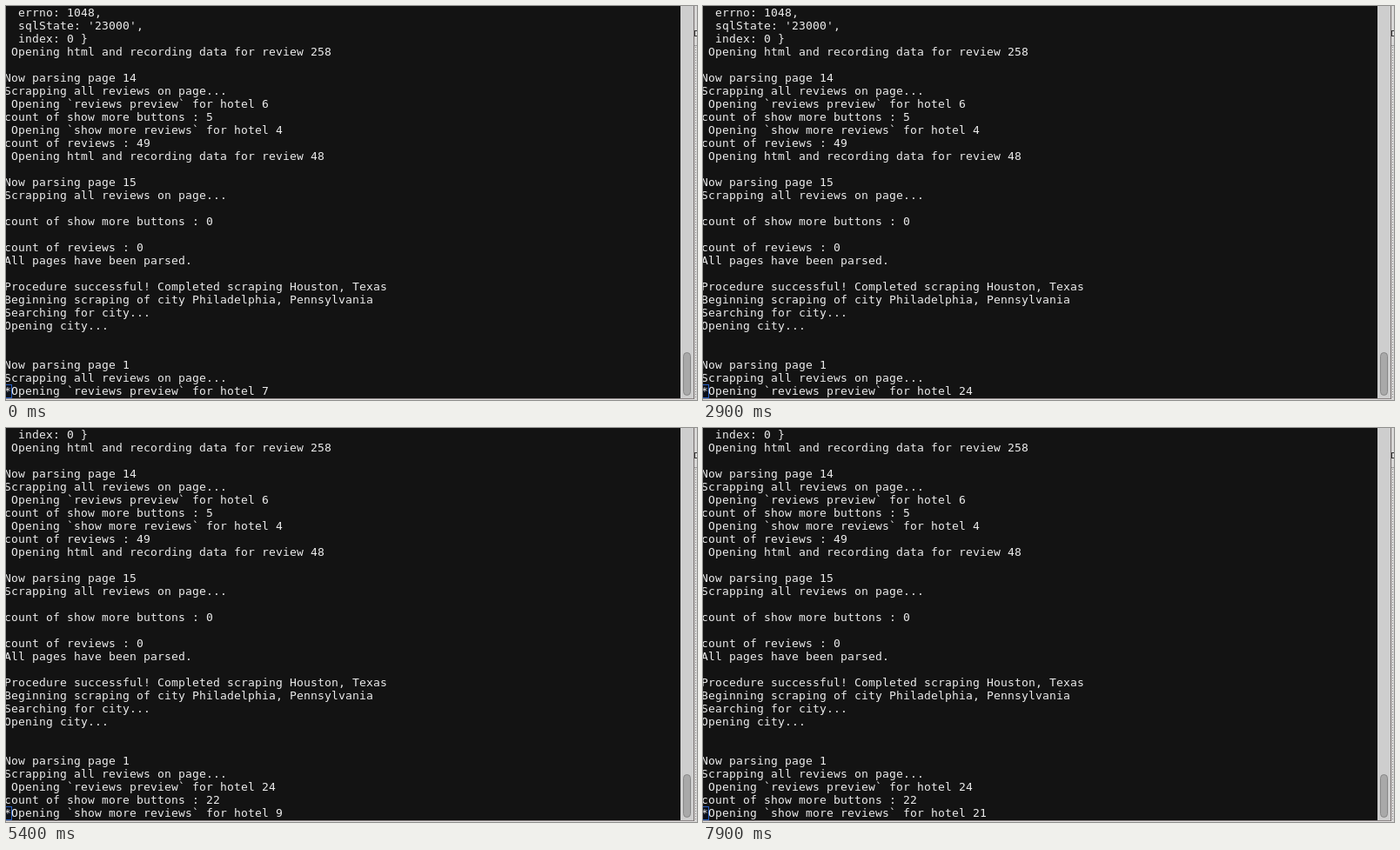
Write an HTML page that moves like this. It is 794 px wide and 453 px high and loops after 8000 ms.

```html
<!DOCTYPE html>
<html lang="en">
<head>
<meta charset="utf-8">
<title>Terminal</title>
<style>
  html, body { margin: 0; width: 100%; height: 100%; overflow: hidden; background: #131313; }
  #stage { position: relative; width: 794px; height: 453px; overflow: hidden; }
  svg { position: absolute; left: 0; top: 0; }
  pre {
    position: absolute; left: -2px; top: 0; margin: 0;
    font: 13px/15px "DejaVu Sans Mono", monospace;
    font-variant-ligatures: none;
    color: #ececec;
  }
</style>
</head>
<body>
<div id="stage">
  <svg width="794" height="453" shape-rendering="crispEdges">
    <rect width="794" height="453" fill="#131313"/>
    <!-- cursor cell -->
    <rect x="-1.5" y="435.5" width="8" height="15" fill="#0b0f18" stroke="#2860c4"/>
    <!-- scrollbar -->
    <rect x="775" width="15" height="451" fill="#cecece"/>
    <rect x="778.5" y="398.5" width="8" height="49" rx="4" fill="#a9a9a9" stroke="#878787" shape-rendering="auto"/>
    <!-- window frame and the strip behind it -->
    <rect y="451" width="791" height="1" fill="#8c8686"/>
    <rect y="452" width="794" height="1" fill="#dedcdc"/>
    <rect x="790" width="1" height="452" fill="#77706f"/>
    <rect x="791" width="3" height="453" fill="#d8d7d6"/>
    <path d="M794 28.5h-2l-1 1v4l1 1h2" fill="none" stroke="#333"/>
    <path d="M791 45.5h3" stroke="#999"/>
    <path d="M792.5 47V451" stroke="#8a8a8a" stroke-dasharray="1 2"/>
  </svg>
  <pre id="screen"></pre>
</div>
<script>
const LOOP = 8000, TICK = 100, CELL = 8, ROWS = 30;
const screen = document.getElementById('screen');

const log = `  errno: 1048,
  sqlState: '23000',
  index: 0 }
 Opening html and recording data for review 258

Now parsing page 14
Scrapping all reviews on page...
 Opening \`reviews preview\` for hotel 6
count of show more buttons : 5
 Opening \`show more reviews\` for hotel 4
count of reviews : 49
 Opening html and recording data for review 48

Now parsing page 15
Scrapping all reviews on page...

count of show more buttons : 0

count of reviews : 0
All pages have been parsed.

Procedure successful! Completed scraping Houston, Texas
Beginning scraping of city Philadelphia, Pennsylvania
Searching for city...
Opening city...


Now parsing page 1
Scrapping all reviews on page...`.split('\n');

// Tick at which each counter step appears
const previewTick = k => Math.floor(1.9 + 1.695 * k);
const showMoreTick = k => k < 5 ? [36, 38, 40, 41, 43][k] : 36 + 2 * k + (k >= 15 ? 1 : 0);

function stepsDone(tickOf, max, tick) {
  let n = 0;
  while (n < max && tickOf(n) <= tick) n++;
  return n;
}

const preview = n => `Opening \`reviews preview\` for hotel ${n}`;
const showMore = n => `Opening \`show more reviews\` for hotel ${n}`;

function linesAt(tick) {
  const opened = stepsDone(showMoreTick, 22, tick);
  if (!opened) return [...log, '*' + preview(7 + stepsDone(previewTick, 17, tick))];
  return [...log, ' ' + preview(24), 'count of show more buttons : 22', '*' + showMore(opened - 1)];
}

// Snap the font's advance to the terminal's cell width
function fitCells() {
  const probe = document.createElement('span');
  probe.textContent = 'm'.repeat(100);
  screen.replaceChildren(probe);
  const advance = probe.getBoundingClientRect().width / 100;
  screen.style.letterSpacing = CELL - advance + 'px';
}

let shown = '';
function draw(ms) {
  const text = linesAt(Math.floor(ms % LOOP / TICK)).slice(-ROWS).join('\n');
  if (text !== shown) screen.textContent = shown = text;
}

function frame() {
  draw(performance.now());
  requestAnimationFrame(frame);
}

fitCells();
frame();
</script>
</body>
</html>
```
